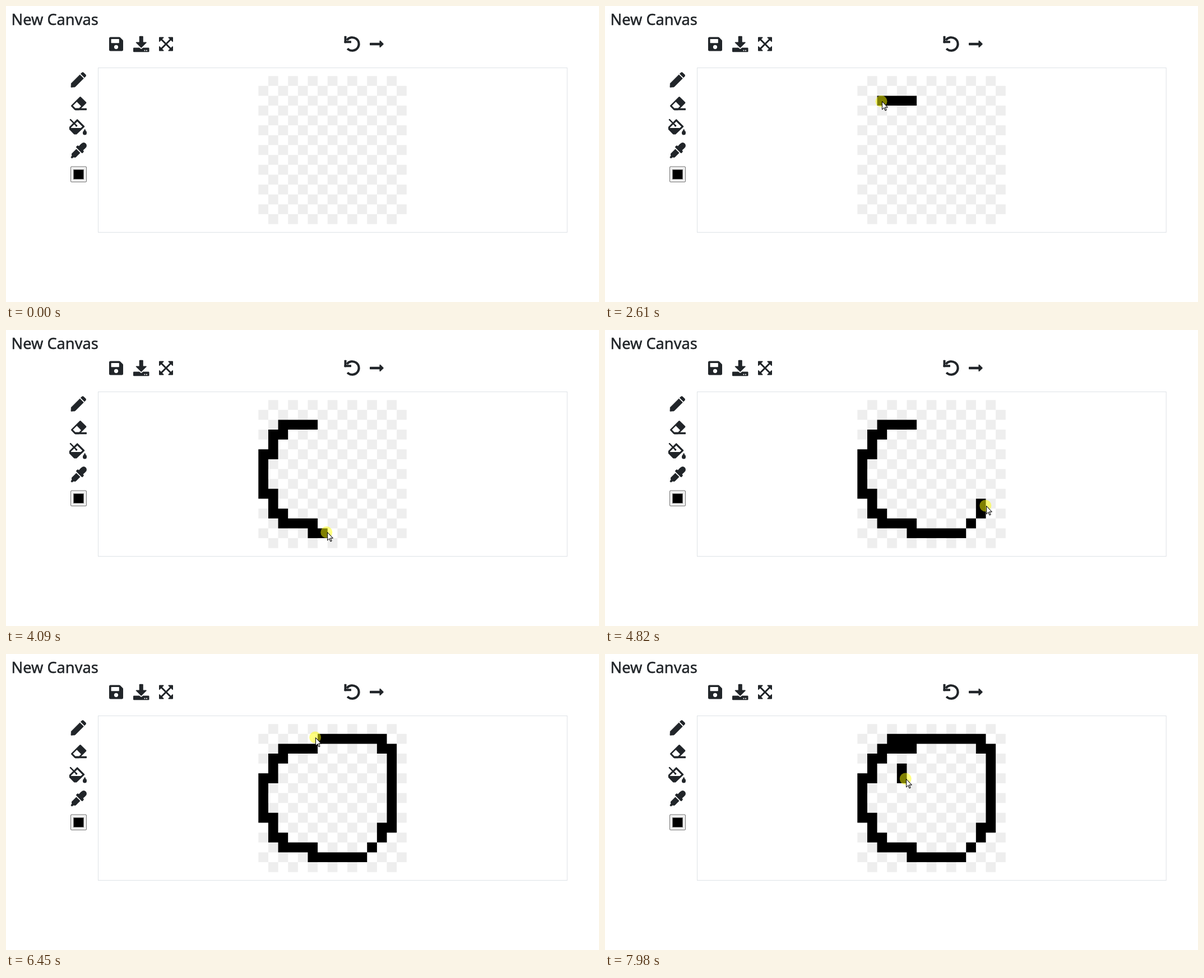
Animation of 1058x529 px, one loop 8000 ms. Source, as an HTML page with a canvas:

```html
<!DOCTYPE html>
<html lang="en">
<head>
<meta charset="utf-8">
<title>New Canvas</title>
<style>
  html, body { margin: 0; width: 100%; height: 100%; overflow: hidden; background: #fff; }
  canvas { position: absolute; left: 0; top: 0; }
  h1 {
    position: absolute; left: 9.5px; top: 6px; margin: 0;
    font: 500 27.2px/36px "Noto Sans", "Open Sans", sans-serif;
    -webkit-text-stroke: 0.5px #212529;
    color: #212529; white-space: nowrap;
  }
</style>
</head>
<body>
<canvas id="stage" width="1058" height="529"></canvas>
<h1>New Canvas</h1>
<script>
const ctx = document.getElementById('stage').getContext('2d');
const LOOP = 8000;
const STEP = 67.1;
const INK_DELAY = 40;   // paint trails the pointer a little
const INK = '#212529';
const GRID = { x: 450.3, y: 125.2, cell: 17.63, count: 15 };

// Turning points of the pointer, in grid cells.
const route = [
  { t: 600, u: 18.4, v: 22.2 },
  { t: 800, u: 7.4, v: 4.9 },
  { t: 940, u: 7.1, v: 4.6 },
  { t: 1300, u: 3.5, v: 3.4 },
  { t: 1730, u: 5.6, v: 2.1 },
  { t: 2120, u: 5.6, v: 2.1, down: true },
  { t: 2540, u: 2.5, v: 2.5, down: true },
  { t: 2880, u: 1.3, v: 4.6, down: true },
  { t: 3160, u: 0.78, v: 6.7, down: true },
  { t: 3400, u: 0.7, v: 9.2, down: true },
  { t: 3690, u: 2.48, v: 11.85, down: true },
  { t: 4090, u: 6.9, v: 13.4, down: true },
  { t: 4400, u: 10.6, v: 13.4, down: true },
  { t: 4580, u: 12.05, v: 11.95, down: true },
  { t: 4840, u: 13.4, v: 10.2, down: true },
  { t: 5430, u: 13.85, v: 3.75, down: true },
  { t: 5640, u: 13.37, v: 2.6, down: true },
  { t: 5780, u: 12.3, v: 1.8, down: true },
  { t: 6450, u: 5.71, v: 1.35, down: true },
  { t: 6700, u: 2.95, v: 2.25 },
  { t: 7110, u: 5.65, v: 2.95 },
  { t: 7600, u: 4.15, v: 4.2, down: true },
  { t: 7980, u: 4.92, v: 5.55, down: true }
];

const lerp = (a, b, k) => a + (b - a) * k;

function pointerAt(t) {
  const i = Math.max(0, route.findLastIndex(p => p.t <= t));
  const a = route[i], b = route[i + 1] || a;
  const k = a === b ? 0 : Math.max(0, (t - a.t) / (b.t - a.t));
  return { u: lerp(a.u, b.u, k), v: lerp(a.v, b.v, k), down: a.down };
}

// Each cell the pressed pointer crosses, with the time it is first reached.
const painted = new Map();
for (let t = 0; t < LOOP; t++) {
  const { u, v, down } = pointerAt(t);
  const key = Math.floor(v) * GRID.count + Math.floor(u);
  if (down && !painted.has(key)) painted.set(key, t);
}

function fillCells(cells, color) {
  ctx.beginPath();
  for (const key of cells) {
    const col = key % GRID.count, row = Math.floor(key / GRID.count);
    ctx.rect(GRID.x + col * GRID.cell, GRID.y + row * GRID.cell, GRID.cell, GRID.cell);
  }
  ctx.fillStyle = color;
  ctx.fill();
}

function at(x, y, angle, draw) {
  ctx.save();
  ctx.translate(x, y);
  ctx.rotate(angle);
  draw();
  ctx.restore();
}

// Polygon from "x,y x,y" with its corners rounded by a stroke of the given width.
function shape(points, round = 0, color = INK) {
  const path = new Path2D('M' + points + 'Z');
  ctx.fillStyle = ctx.strokeStyle = color;
  ctx.lineJoin = 'round';
  ctx.lineWidth = round;
  ctx.fill(path);
  if (round) ctx.stroke(path);
}

function bar(x, y, w, h, r = 0.7, color = INK) {
  ctx.beginPath();
  ctx.roundRect(x, y, w, h, r);
  ctx.fillStyle = color;
  ctx.fill();
}

function dot(x, y, r, color = INK) {
  ctx.beginPath();
  ctx.arc(x, y, r, 0, Math.PI * 2);
  ctx.fillStyle = color;
  ctx.fill();
}

function line(x0, y0, x1, y1, width) {
  ctx.beginPath();
  ctx.moveTo(x0, y0);
  ctx.lineTo(x1, y1);
  ctx.strokeStyle = INK;
  ctx.lineWidth = width;
  ctx.lineCap = 'round';
  ctx.stroke();
}

function saveIcon() {
  shape('2.5,2.5 18,2.5 22.5,7 22.5,22.5 2.5,22.5', 5);
  bar(3.6, 3.6, 14.2, 7.1, 0.7, '#fff');
  dot(12.5, 17.8, 3.6, '#fff');
}

function downloadIcon() {
  const head = '5.5,11.5 23,11.5 14.25,20.3';
  bar(0, 20.9, 28.5, 7.6, 1.3);
  shape(head, 5, '#fff');
  bar(10.7, 0, 7.1, 13, 1.3);
  shape(head, 1.6);
  dot(20.5, 25.8, 1.1, '#fff');
  dot(24, 25.8, 1.1, '#fff');
}

function expandIcon() {
  for (let i = 0; i < 4; i++) {
    ctx.rotate(Math.PI / 2);
    line(0, 0, 9, 9, 3.1);
    shape('11.7,11.7 11.7,4.7 4.7,11.7', 1.6);
  }
}

function undoIcon() {
  bar(0, 0, 4, 12.5);
  bar(0, 8.5, 12.5, 4);
  ctx.beginPath();
  ctx.arc(14.3, 14.25, 11.8, -2.52, 2.38);
  ctx.lineWidth = 4;
  ctx.lineCap = 'butt';
  ctx.strokeStyle = INK;
  ctx.stroke();
}

function arrowIcon() {
  bar(0, 12, 19, 4.5);
  shape('18.4,9.1 23.7,14.25 18.4,19.4', 2);
}

function pencilIcon() {
  shape('.8,0 6,-4.6 27.6,-4.6 27.6,4.6 6,4.6', 0.9);
  bar(29.7, -5, 5.6, 10, [0, 2.8, 2.8, 0]);
}

function eraserIcon() {
  shape('26.4,13.4 17,4 2,19 8,25.2 14.6,25.2', 3);
  shape('10.9,11.8 18.5,19.4 14.8,23.2 8.4,23.2 3.9,18.7', 0, '#fff');
  bar(8, 23.2, 20.5, 3.5);
}

function fillIcon() {
  shape('27,13.4 15.2,1.6 2.2,14.6 2.2,18.2 10.2,26.3 13.3,26.3', 2.6);
  shape('3.7,16 21.5,16 24.2,13.4 15.2,4.4 4.4,14.8', 0, '#fff');
  line(3, 1.2, 13.6, 11.8, 2.5);
  dot(13.6, 12, 1.8);
  shape('28.5,18.2 25.5,23.4 31.5,23.4', 0.6);
  dot(28.5, 25, 3.5);
}

function dropperIcon() {
  shape('1.4,-1.4 1.4,1.4 7,2.8 7,-2.8');
  bar(5.5, -5, 13.6, 10, [3, 0, 0, 3]);
  bar(20.8, -8, 5, 16, 1.5);
  bar(24, -5.3, 14, 10.6, 5.3);
  bar(24, -5.3, 8, 10.6, 0);
}

function drawPage() {
  ctx.fillStyle = '#fff';
  ctx.fillRect(0, 0, 1058, 529);
  ctx.lineWidth = 1;
  ctx.strokeStyle = '#dee2e6';
  ctx.strokeRect(164.5, 110.5, 836.7, 294);

  at(184, 55.5, 0, saveIcon);
  at(227, 53.7, 0, downloadIcon);
  at(285.5, 68, 0, expandIcon);
  at(603.5, 53.7, 0, undoIcon);
  at(649, 53.7, 0, arrowIcon);
  at(115.5, 145.7, -Math.PI / 4, pencilIcon);
  at(115.5, 159.5, 0, eraserIcon);
  at(112, 202, 0, fillIcon);
  at(115.5, 272.5, -Math.PI / 4, dropperIcon);

  bar(115, 286.500, 29, 28.500, 2.500, '#767676');
  bar(116, 287.500, 27, 26.500, 1.500, '#efefef');
  bar(120, 292, 19, 18, 0, '#767676');
  bar(121, 293, 17, 16, 0, '#000');

  const cells = Array.from({ length: GRID.count ** 2 }, (_, i) => i);
  fillCells(cells.filter(i => i % 2), '#eee');
}

function drawPointer({ u, v, down }) {
  const x = GRID.x + u * GRID.cell, y = GRID.y + v * GRID.cell;
  if (down) dot(x - 0.8, y, 10.5, 'rgba(255, 255, 0, 0.5)');
  at(Math.round(x), Math.round(y), 0, () => {
    const arrow = '.5,.5 .5,15 3.8,11.9 6.1,17 8.2,16 6,11.1 10.4,11.1';
    shape(arrow, 1, '#000');
    shape('1,1.7 1,13.9 4,11 6.5,16.2 7.500,15.700 5.200,10.600 9.200,10.600', 0, '#fff');
  });
}

function render(now) {
  const t = Math.floor((now % LOOP + 5) / STEP) * STEP;
  drawPage();
  const inked = [...painted].filter(([, time]) => time <= t - INK_DELAY);
  fillCells(inked.map(([key]) => key), '#000');
  if (t >= route[0].t) drawPointer(pointerAt(t));
}

const origin = performance.now();
function tick() {
  render(performance.now() - origin);
  requestAnimationFrame(tick);
}
tick();
</script>
</body>
</html>
```
